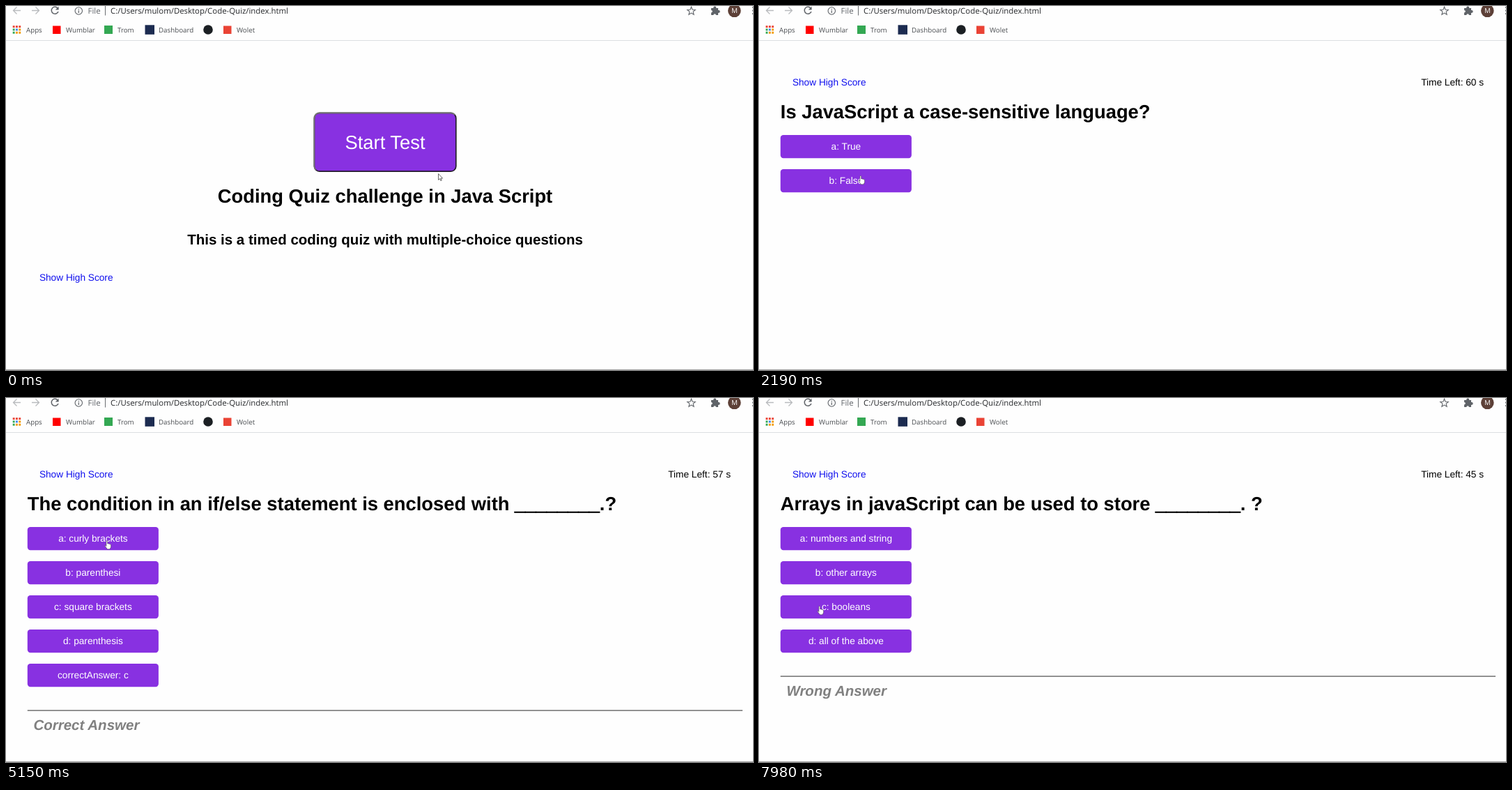
These frames come from a looping animation (1072x522 px, 8000 ms). An HTML page:

```html
<!DOCTYPE html>
<html lang="en">
<head>
<meta charset="utf-8">
<title>Code Quiz</title>
<style>
html, body { margin: 0; width: 100%; height: 100%; overflow: hidden; background: #fefefe; }
svg { display: block; width: 100vw; height: 100vh; }
text { font-family: "Liberation Sans", Arial, sans-serif; font-size: 13.68px; text-rendering: geometricPrecision; white-space: pre; }
.h1 { font-size: 27.36px; font-weight: bold; }
.h2 { font-size: 20.52px; font-weight: bold; }
.start { font-size: 27.36px; fill: #fff; }
.link { fill: #1010ee; }
.answer { fill: #fff; }
.result { font-size: 20.52px; font-weight: bold; font-style: italic; fill: #808080; }
.blank { stroke: #000; stroke-width: 1; }
.mid { text-anchor: middle; }
.bar text { font-family: "Open Sans", "Noto Sans", sans-serif; font-size: 9.75px; fill: #4a4d51; }
.bar .url { font-size: 11.4px; fill: #26282b; }
.icon { fill: none; stroke: #5f6368; stroke-width: 1.3; }
</style>
</head>
<body>
<svg viewBox="0 0 1072 522">
  <rect width="1072" height="522" fill="#fefefe"/>
  <g class="bar">
    <path class="icon" style="stroke:#b9bbbe" d="M21 6.5H10.5M15.5 1.5L10.5 6.5L15.5 11.5M37 6.5H47.5M42.5 1.5L47.5 6.5L42.5 11.5"/>
    <path class="icon" style="stroke-width:1.5" d="M74.2 3.2A5 5 0 1 0 75 8"/>
    <path fill="#5f6368" d="M75.6 .8V5.6H70.8Z"/>
    <circle class="icon" cx="104.3" cy="7" r="5.2" style="stroke-width:1.1"/>
    <path fill="#5f6368" d="M103.7 6.3H104.9V10H103.7ZM103.7 4H104.9V5.2H103.7Z"/>
    <text class="url" style="fill:#5f6368" x="117.5" y="11">File</text>
    <path stroke="#6b6e72" d="M142.5 0V13.5"/>
    <text class="url" x="150" y="11">C:/Users/mulom/Desktop/Code-Quiz/index.html</text>
    <path class="icon" style="stroke-width:1.1" d="M983.5 1.3L985.1 5.2L989.3 5.5L986.1 8.2L987.1 12.3L983.5 10.1L979.9 12.3L980.9 8.2L977.7 5.5L981.9 5.2Z"/>
    <path fill="#5f6368" d="M1012 3H1015.3A2 2 0 1 1 1019.1 3H1022V6A2 2 0 1 1 1022 9.8V13H1018.9A1.8 1.8 0 0 0 1015.3 13H1012V9.6A1.8 1.8 0 0 0 1012 6Z"/>
    <circle cx="1045.3" cy="6.8" r="9.3" fill="#5d4037"/>
    <text class="mid" x="1045.3" y="10.4" style="fill:#fff">M</text>
    <g fill="#5f6368"><circle cx="1072.3" cy="2" r="1.3"/><circle cx="1072.3" cy="6.5" r="1.3"/><circle cx="1072.3" cy="11" r="1.3"/></g>
    <g id="apps"></g>
    <rect x="67" y="28.5" width="11.5" height="11.5" fill="#f00"/>
    <rect x="141" y="28" width="12" height="12" fill="#34a853"/>
    <rect x="199.5" y="27.3" width="13.5" height="13.5" fill="#1c2b50"/>
    <circle cx="290" cy="34" r="6.8" fill="#1b1f23"/>
    <rect x="312" y="28.5" width="11.5" height="11.5" fill="#ea4335"/>
    <text x="29" y="38">Apps</text>
    <text x="86" y="38">Wumblar</text>
    <text x="160" y="38">Trom</text>
    <text x="219" y="38">Dashboard</text>
    <text x="331" y="38">Wolet</text>
    <path stroke="#dcdee1" d="M0 49.5H1072"/>
  </g>
  <g id="page"></g>
  <text id="timer" x="1040.1" y="113.9" text-anchor="end"></text>
  <path id="cursor"/>
  <path stroke="#a6a6a6" d="M0 521.5H1072"/>
</svg>
<script>
const LOOP = 8000;
const PURPLE = '#8831e1';
const $ = id => document.getElementById(id);

const SHAPES = {
  arrow: { d: 'M.5 .6V9.4L2.5 7.6L3.9 10.6L5.2 10L3.9 7.1H6.6Z', stroke: '#444', width: .8 },
  hand: {
    d: 'M2.9 8.6V1.5Q2.9 .5 3.8 .5T4.7 1.5V4.9Q5.6 4.3 6.3 5.2Q7.3 4.7 7.9 5.7Q9.5 5.3 9.6 7V9.3Q9.4 11.1 8.4 11.8V12.8H3.9V12L1 8.2Q.6 7.2 1.8 7.2Z',
    stroke: '#333', width: .5
  }
};

// Each track is a list of [start time, value...]; values hold until the next start.
const CURSOR = [
  [0, 620, 240, 'arrow'], [160, 586, 194, 'arrow'], [310, 581, 191, 'arrow'],
  [1730, 494, 221, 'arrow'], [1890, 230, 255, 'arrow'], [2040, 142, 243, 'hand'],
  [2320, 138, 214, 'hand'], [2470, 139, 212, 'hand'], [2720, 139, 211, 'hand'],
  [2870, 141, 204, 'hand'], [5280, 117, 243, 'hand'], [5420, 116, 247, 'hand'],
  [7680, 107, 253, 'hand'], [7840, 82, 289, 'hand'], [7980, 83, 298, 'hand']
];
const TIMER = [[0, ''], [2190, 60], [3140, 59], [4160, 58], [5150, 57], [6130, 56], [7090, 45]];
const PAGES = [
  [0, startPage('#767676', '#241c2c')],
  [1020, startPage('#241c2c', '#767676')], // button held down
  [1140, quizPage('Is JavaScript a case-sensitive language?', ['True', 'False'])],
  [4160, quizPage('The condition in an if/else statement is enclosed with ________.?',
    ['curly brackets', 'parenthesi', 'square brackets', 'parenthesis', 'correctAnswer: c'], 'Correct Answer')],
  [6970, quizPage('Arrays in javaScript can be used to store ________. ?',
    ['numbers and string', 'other arrays', 'booleans', 'all of the above'], 'Wrong Answer')]
];

function label(cls, x, y, text) {
  return `<text class="${cls}" x="${x}" y="${y}">${text}</text>`;
}

function startPage(topLeft, bottomRight) {
  const box = 'x="442.4" y="153.4" width="203.4" height="83.8" rx="7.5" stroke-width="1.7"';
  return `<clipPath id="lit"><path d="M441 152H648L604 195H484L441 239Z"/></clipPath>
    <rect ${box} fill="${PURPLE}" stroke="${bottomRight}"/>
    <rect ${box} fill="none" stroke="${topLeft}" clip-path="url(#lit)"/>` +
    label('start mid', 544, 205, 'Start Test') +
    label('h1 mid', 544, 281.5, 'Coding Quiz challenge in Java Script') +
    label('h2 mid', 544, 342, 'This is a timed coding quiz with multiple-choice questions') +
    label('link', 47.9, 393.9, 'Show High Score');
}

function quizPage(question, answers, result) {
  const heading = question.replace(/_+/, '<tspan class="blank">$&</tspan>');
  let html = label('link', 47.9, 113.9, 'Show High Score') + label('h1', 30.8, 160.5, heading);
  answers.forEach((answer, i) => {
    const y = 185 + 49 * i;
    const text = answer.includes(':') ? answer : 'abcd'[i] + ': ' + answer;
    html += `<rect x="30.8" y="${y}" width="188.1" height="33.2" rx="4.2" fill="${PURPLE}"/>` +
      label('answer mid', 124.9, y + 21.2, text);
  });
  if (result) {
    const y = 203 + 49 * answers.length;
    html += `<rect x="30.8" y="${y - .7}" width="1026.2" height="1.7" fill="#808080"/>` +
      label('result', 39.4, y + 28.4, result);
  }
  return html;
}

function at(track, t) {
  return track.filter(step => step[0] <= t).pop();
}

let shown;
function render(t) {
  const page = at(PAGES, t);
  if (page !== shown) {
    $('page').innerHTML = page[1];
    shown = page;
  }
  const left = at(TIMER, t)[1];
  $('timer').textContent = left ? `Time Left: ${left} s` : '';

  const [, x, y, kind] = at(CURSOR, t);
  const shape = SHAPES[kind], cursor = $('cursor');
  cursor.setAttribute('d', shape.d);
  cursor.setAttribute('fill', '#fff');
  cursor.setAttribute('stroke', shape.stroke);
  cursor.setAttribute('stroke-width', shape.width);
  cursor.setAttribute('transform', `translate(${x} ${y})`);
}

const dots = ['#ea4335', '#ea4335', '#ea4335', '#34a853', '#4285f4', '#f29900', '#34a853', '#f29900', '#f29900'];
$('apps').innerHTML = dots.map((c, i) =>
  `<rect x="${9.7 + i % 3 * 4.3}" y="${28.2 + Math.floor(i / 3) * 4.3}" width="2.9" height="2.9" fill="${c}"/>`).join('');

const begin = performance.now();
function tick() {
  render((performance.now() - begin) % LOOP);
  requestAnimationFrame(tick);
}
tick();
</script>
</body>
</html>
```
